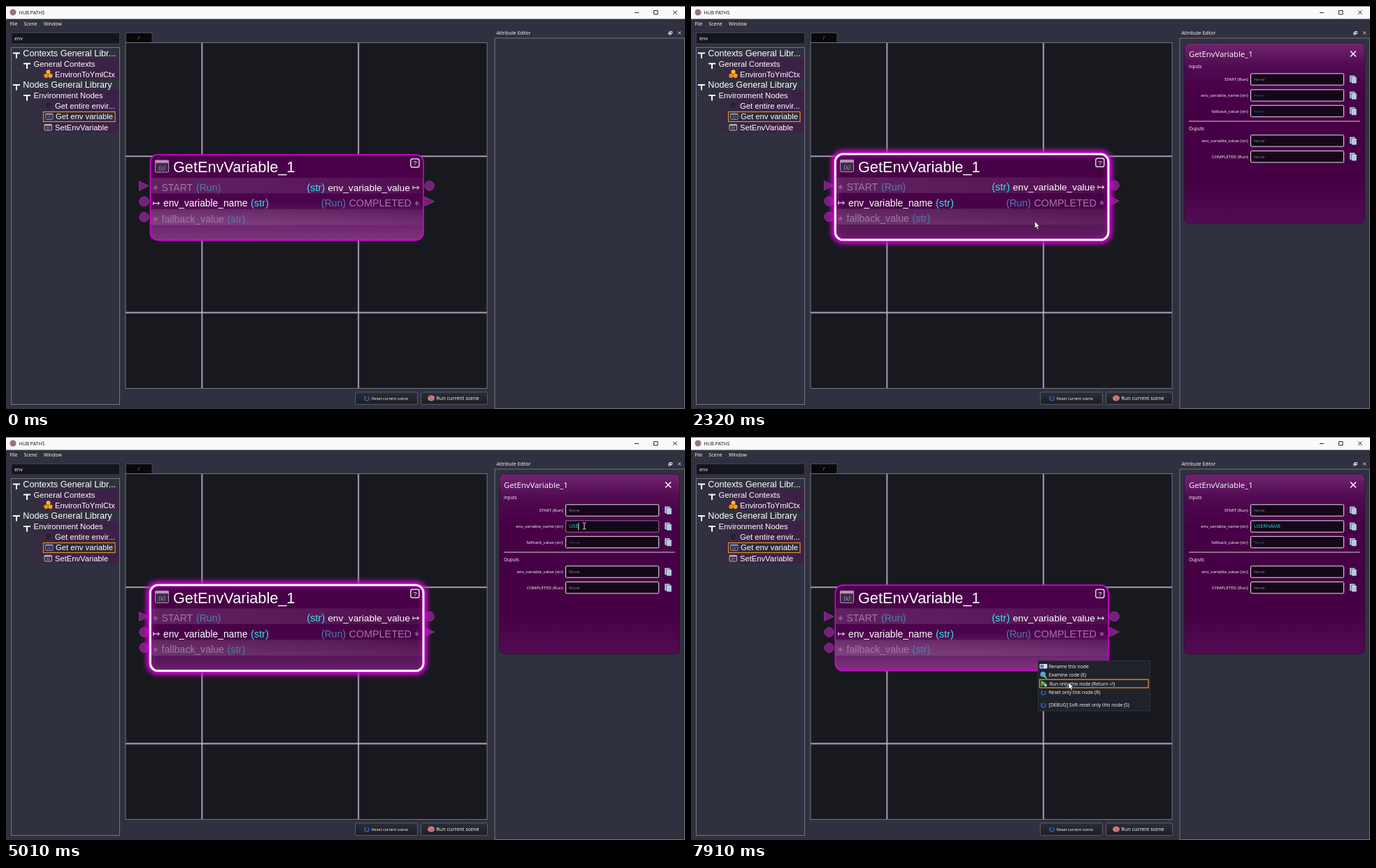
Write an HTML page that moves like this. It is 971x577 px and loops after 8 s.

```html
<!DOCTYPE html>
<html lang="en">
<head>
<meta charset="utf-8">
<title>Node editor</title>
<style>
html, body { margin: 0; width: 100%; height: 100%; overflow: hidden; background: #30313e; }
svg { display: block; width: 971px; height: 577px; font: 6.9px "Open Sans", "Noto Sans", sans-serif; fill: #fff; }
.a { font-family: "Liberation Sans", Arial, sans-serif; }
.end { text-anchor: end; }
.mid { text-anchor: middle; }
.line { fill: none; stroke: #fff; }
.frame { fill: none; stroke: #74757f; }
.dim { fill: #a277a5; }
.type { fill: #2ee6ee; }
.dimtype { fill: #4b7fb3; }
</style>
</head>
<body>
<svg id="stage" viewBox="0 0 971 577"></svg>
<script>
const LOOP = 8000;
const stage = document.getElementById('stage');

const text = (x, y, str, size = 6.9, cls = '', more = '') =>
  `<text x="${x}" y="${y}" font-size="${size}" class="${cls}" ${more}>${str}</text>`;
const rect = (x, y, w, h, more = '') =>
  `<rect x="${x}" y="${y}" width="${w}" height="${h}" ${more}/>`;
const path = (d, more = '') => `<path d="${d}" ${more}/>`;
const circle = (x, y, r, more = '') => `<circle cx="${x}" cy="${y}" r="${r}" ${more}/>`;
const gradient = (id, stops, dir = 'x2="0" y2="1"') =>
  `<linearGradient id="${id}" ${dir}>${stops.map(([at, color, alpha = 1]) =>
    `<stop offset="${at}" stop-color="${color}" stop-opacity="${alpha}"/>`).join('')}</linearGradient>`;

const branch = (x, y) => path(`M${x} ${y}h10M${x + 5} ${y}v7.5`, 'class="line" stroke-width="2"');
const star = (x, y) => path(`M${x} ${y - 3.5}v7M${x - 3} ${y - 1.7}l6 3.4M${x - 3} ${y + 1.7}l6-3.4`,
  'class="line" style="stroke:#a277a5" stroke-width=".9"');
const mapsTo = (x, y) => path(`M${x + .5} ${y - 2.5}v5M${x + .5} ${y}h8.5m-2.6-2.5l2.6 2.5l-2.6 2.5`, 'class="line"');
const reload = (x, y, r) => path(`M${x - r * .7} ${y - r * .7}A${r} ${r} 0 1 0 ${x + r * .5} ${y - r * .87}`,
  'fill="none" stroke="#2a62b8" stroke-width="1.6"') +
  path(`M${x - r * 1.3} ${y - r}h${r}v${r}z`, 'fill="#2a62b8"');
const winIcon = (x, y, w, h, color, glyph) =>
  rect(x, y, w, h, `rx="1" fill="#3b2b4a" stroke="${color}"`) +
  rect(x, y, w, h * .22, `fill="${color}"`) +
  text(x + w / 2, y + h * .82, '(x)', glyph, 'mid', `font-style="italic" style="fill:${color}"`);

const defs = `<defs>
  ${gradient('rowFill', [[0, '#3d2047', 0], [.35, '#3d2047', .7], [1, '#3d2047']], '')}
  ${gradient('bodyFill', [[0, '#4a0049'], [.55, '#4b034b'], [.75, '#642064'], [1, '#80327f']])}
  ${gradient('bodyOnFill', [[0, '#480047'], [.6, '#480347'], [.8, '#561656'], [1, '#5e1c5e']])}
  ${gradient('bandFill', [[0, '#fff', .13], [.6, '#fff', .09], [1, '#fff', .04]], '')}
  ${gradient('cardFill', [[0, '#70266f'], [.13, '#510a51'], [.3, '#470046'], [.75, '#450044'], [1, '#520c52']])}
  ${gradient('buttonFill', [[0, '#2c2e35'], [1, '#1d1e24']])}
  <filter id="blur" x="-10%" y="-20%" width="120%" height="140%"><feGaussianBlur stdDeviation="3.6"/></filter>
</defs>`;

const titleBar = rect(0, 0, 971, 18.5, 'fill="#fbf9fb"') + rect(0, 0, 971, .8, 'fill="#55505a"') +
  circle(10, 9, 4.5, 'fill="#98727f"') +
  `<g id="caption">${text(18.5, 11.7, 'HUB PATHS', 6.9, '', 'style="fill:#111"')}
  ${path('M899 9.5h6M926.5 6.5h5.5v5.5h-5.5zM954 6.5l5.5 5.5m0-5.5l-5.5 5.5', 'fill="none" stroke="#111" stroke-width=".9"')}</g>` +
  text(5.5, 27.5, 'File') + text(25.5, 27.5, 'Scene') + text(54, 27.5, 'Window');

const tintRow = y => rect(24, y - 7.6, 138, 15.2, 'fill="url(#rowFill)"');
const library = rect(7.5, 38.5, 155, 15.5, 'fill="#15161c" stroke="#3d3e49"') + text(12, 49, 'env', 7.2) +
  rect(7.5, 59.5, 155, 511, 'class="frame"') +
  [82.5, 97.7, 128, 143.2, 158.4, 173.6].map(tintRow).join('') +
  branch(10, 67.5) + branch(25, 82.5) + branch(10, 113) + branch(25, 128) +
  text(24.3, 71.5, 'Contexts General Libr...', 12.65, 'a') +
  text(39.5, 86.7, 'General Contexts', 11.3, 'a') +
  text(70, 101.5, 'EnvironToYmlCtx', 11.2, 'a') +
  text(24.3, 117.2, 'Nodes General Library', 12.65, 'a') +
  text(39.5, 132.2, 'Environment Nodes', 11.3, 'a') +
  text(70, 147.3, 'Get entire envir...', 11.25, 'a') +
  rect(53.5, 151.5, 102.5, 14, 'fill="#2e2a3a" stroke="#e0902a" stroke-width="1.2"') +
  text(71, 162.3, 'Get env variable', 11.25, 'a') +
  text(70, 177.8, 'SetEnvVariable', 11.2, 'a') +
  circle(60.5, 94.3, 3, 'fill="#ffb52e"') + circle(57.3, 99.8, 3.1, 'fill="#ee8f13"') + circle(63.4, 99.8, 3.1, 'fill="#f5a11f"') +
  text(60.5, 146, 'e', 13, 'mid', 'style="fill:#17131c"') +
  winIcon(56.5, 154, 10.5, 8.5, '#7d8fb5', 5) + winIcon(55, 169.5, 10.5, 8.5, '#b9b4c2', 5);

const button = (x, w) => rect(x, 552.8, w, 17.5, 'rx="2" fill="url(#buttonFill)" stroke="#5c5d67"');
const gridLine = d => path(d, 'stroke="#c8b2cb" stroke-opacity=".75" stroke-width="2.3"');
const canvas = rect(171.5, 38.5, 37.5, 14, 'fill="#08080a" stroke="#4c4d57"') +
  text(190, 48, '/', 7.5, 'mid', 'style="fill:#e58a1c"') +
  rect(171, 52.5, 517, 495, 'fill="#18191f"') +
  ['M280.3 53v494', 'M504 53v494', 'M171 215.2h517', 'M171 439h517'].map(gridLine).join('') +
  rect(171, 52.5, 517, 495, 'class="frame"') +
  button(499.5, 89) + button(593.5, 95) +
  reload(516, 562, 3) + text(523, 564, 'Reset current scene', 5.65) +
  `<ellipse cx="608" cy="561.5" rx="5" ry="4" fill="#d98289"/>` +
  path('M604 561q2-3 4 0t4 0M606 564q2-2 4 0', 'fill="none" stroke="#8f3f4c" stroke-width=".8"') +
  text(615.3, 564.3, 'Run current scene', 7.25);

const port = 'fill="#76207a" stroke="#932f95"';
const outline = more => rect(206.3, 212.7, 390.6, 122.7, `rx="11" ${more}`);
const node = `<g id="node">` +
  path('M190.5 251v13l13.5-6.5zM598.8 273.3v13l13.5-6.5z', port) +
  circle(197.5, 280, 6.7, port) + circle(197.5, 302.3, 6.7, port) + circle(605.5, 257.5, 6.7, port) +
  `<g class="on">${outline('fill="none" stroke="#d800d8" stroke-width="10" filter="url(#blur)"')}${outline('fill="url(#bodyOnFill)"')}</g>` +
  `<g class="off">${outline('fill="url(#bodyFill)"')}</g>` +
  rect(207, 246, 389.5, 22.4, 'fill="url(#bandFill)"') + rect(207, 291, 389.5, 22.6, 'fill="url(#bandFill)"') +
  `<g class="off">${outline('fill="none" stroke="#d800d8" stroke-width="1.6"')}</g>` +
  `<g class="on">${outline('fill="none" stroke="#d800d8" stroke-width="6" stroke-opacity=".55" filter="url(#blur)"')}
    ${outline('fill="none" stroke="#fff" stroke-width="3"')}</g>` +
  winIcon(213.5, 221, 19, 17, '#b892bb', 9) +
  text(239, 238.2, 'GetEnvVariable_1', 21.7, 'a') +
  rect(578.8, 218.8, 12, 12, 'rx="2.5" class="line" stroke-width="1.2"') + text(584.8, 228.3, '?', 9.5, 'a mid') +
  star(213.8, 260) + text(222.5, 264.6, 'START', 14, 'a dim') + text(272, 264.6, '(Run)', 14.1, 'a dimtype') +
  mapsTo(210.3, 282.5) + text(225, 287.4, 'env_variable_name', 13.8, 'a') + text(350, 287.4, '(str)', 14.5, 'a type') +
  star(213.8, 305) + text(222.5, 309.8, 'fallback_value', 14.1, 'a dim') + text(316.5, 309.8, '(str)', 14.5, 'a dimtype') +
  text(456, 264.6, '(str)', 14.5, 'a end type') + text(577.8, 264.6, 'env_variable_value', 13.65, 'a end') + mapsTo(581.5, 260) +
  text(486, 287.4, '(Run)', 14.1, 'a end dimtype') + text(580, 287.4, 'COMPLETED', 14.4, 'a end dim') + star(587.5, 282.5) +
  `</g>`;

const field = (y, label, color, id = '') =>
  text(796.5, y + 2.4, label, 6.1, 'end') +
  rect(800.5, y - 8.2, 133, 16.4, `rx="1" fill="#170519" stroke="#e9dfea" ${id && `id="${id}Box"`}`) +
  text(805, y + 2.4, 'None', 6.1, '', `style="fill:${color}" ${id && `id="${id}"`}`) +
  rect(942.5, y - 5, 6.5, 8.5, 'fill="#7f9fc0" stroke="#d9e6f0" stroke-width=".8"') +
  rect(945, y - 3, 6.5, 8.5, 'fill="#d9e8f2" stroke="#6889aa" stroke-width=".7"') +
  path(`M946.3 ${y - .5}h4m-4 2h4m-4 2h4`, 'stroke="#6889aa" stroke-width=".7"');
const editor = text(701.5, 41.3, 'Attribute Editor', 6.8) +
  path('M949 36.5h3.5v3h-3.5zM947.7 38h3v3h-3zM961.2 36.5l4 4m0-4l-4 4', 'class="line" stroke-width=".8"') +
  rect(699, 46, 271.5, 530.5, 'class="frame"') +
  `<g id="card">` + rect(705.5, 53, 258, 258, 'rx="7" fill="url(#cardFill)" stroke="#24102a" stroke-width=".7"') +
  text(712, 73, 'GetEnvVariable_1', 11.3) + path('M943 64.5l8 8m0-8l-8 8', 'class="line" stroke-width="1.5"') +
  text(712, 89.3, 'Inputs', 6.3) + text(712, 177.5, 'Ouputs', 6.3) + path('M712 165h244.5', 'class="line" stroke-opacity=".8"') +
  field(105, 'START (Run)', '#8b8290') + field(128, 'env_variable_name (str)', '#3c5578', 'value') +
  field(150.5, 'fallback_value (str)', '#3c5578') + field(193, 'env_variable_value (str)', '#8b8290') +
  field(215.7, 'COMPLETED (Run)', '#8b8290') + rect(0, 123, .9, 10, 'id="caret"') + `</g>`;

const menu = `<g id="menu">` + rect(496.5, 320.5, 160, 71.5, 'fill="#20222b" stroke="#30323c"') +
  rect(498.5, 347.2, 155.5, 11.8, 'id="pick" fill="#23242c" stroke="#e0902a" stroke-width="1.3"') +
  rect(498.5, 325, 11, 6.5, 'rx="1" fill="#dbe6f2"') + rect(499.5, 326, 5, 4.5, 'fill="#4b82c4"') +
  path('M505.5 342.5l3 3', 'stroke="#c8ccd4" stroke-width="1.6"') + circle(503.3, 339.8, 3.3, 'fill="#3ba6dc" stroke="#a9d4ee" stroke-width=".8"') +
  path('M500.5 348.5v8.5l8-4.2z', 'fill="#39c436"') + circle(507, 355.5, 1.8, 'fill="#d8ead6"') +
  reload(504, 366, 3) + reload(504, 384, 3) +
  text(511.7, 330.6, 'Rename this node', 6.75) + text(511.7, 343, 'Examine code (E)', 6.75) +
  text(512.7, 355.6, 'Run only this node (Return ⏎)', 6.75) + text(511.7, 368.4, 'Reset only this node (R)', 6.75) +
  text(511.7, 386.4, '[DEBUG] Soft-reset only this node (S)', 6.75) + `</g>`;

const pointers = path('M0 0V9.6L2.2 7.6L3.8 11.2L5.4 10.5L3.8 7H6.9Z', 'id="arrow" stroke="#222" stroke-width=".6"') +
  path('M-2.3-4.6q2 0 2.3 1q.3-1 2.3-1M0-3.6v7.4M-2.3 4.8q2 0 2.3-1q.3 1 2.3 1', 'id="beam" class="line" stroke-width=".9"');

stage.innerHTML = defs + rect(0, 0, 971, 577, 'fill="#30313e"') + titleBar + library + canvas + node + editor + menu + pointers;

const $ = id => document.getElementById(id);
const show = (el, on) => el.style.display = on ? '' : 'none';
const ramp = (t, from, to) => Math.min(1, Math.max(0, (t - from) / (to - from)));

// time, x, y of the pointer
const track = [
  [1270, 413.5, 507.5], [1540, 514, 405], [1800, 491.7, 308.5], [2490, 491.7, 308.5],
  [2800, 893, 137], [3120, 864, 62.5], [3160, 864, 62.5], [3250, 862, 82], [3300, 862, 82], [3640, 830, 124],
  [4030, 825, 126], [4110, 827, 127.3], [6330, 827, 127.3], [6660, 590, 420], [6790, 590, 420],
  [7060, 496.8, 320.5], [7660, 496.8, 320.5], [7910, 540, 351.5]
];
function pointerAt(t) {
  const i = track.findIndex(p => p[0] > t);
  if (i < 0) return track[track.length - 1].slice(1);
  const [a, b] = [track[Math.max(0, i - 1)], track[i]];
  const k = ramp(t, a[0], b[0]), e = k * k * (3 - 2 * k);
  return [a[1] + (b[1] - a[1]) * e, a[2] + (b[2] - a[2]) * e];
}

const WORD = 'USERNAME';
const keys = [4720, 4810, 5010, 5220, 5420, 5460, 5670, 5710];

function draw(t) {
  const active = 1 - ramp(t, 250, 450) + ramp(t, 2090, 2200);
  $('caption').setAttribute('opacity', .45 + .55 * active);

  const selected = t >= 2130 && t < 6730;
  stage.querySelectorAll('.on').forEach(el => show(el, selected));
  stage.querySelectorAll('.off').forEach(el => show(el, !selected));
  $('node').setAttribute('transform', `translate(0 ${t < 2130 ? 0 : -.6})`);
  show($('card'), t >= 2270);

  const typed = keys.filter(k => t >= k).length;
  const focus = t >= 3960 && t < 6730;
  const value = $('value');
  value.textContent = typed ? WORD.slice(0, typed) : 'None';
  value.setAttribute('font-size', typed ? 7.25 : 6.1);
  value.style.fill = typed ? '#1fd8d8' : '#3c5578';
  $('valueBox').setAttribute('stroke-dasharray', focus ? '1.2 1.2' : 'none');
  show($('caret'), focus && !(t >= 4520 && t < 4720));
  if (focus) $('caret').setAttribute('x', typed ? 805 + value.getComputedTextLength() : 805);

  const [x, y] = pointerAt(t);
  const inField = t >= 2270 && x > 800 && x < 934 && Math.abs(y - 128) < 8.5;
  show($('arrow'), t >= 1270 && !inField);
  show($('beam'), inField);
  for (const id of ['arrow', 'beam']) $(id).setAttribute('transform', `translate(${x} ${y})`);

  $('menu').setAttribute('opacity', ramp(t, 7150, 7240));
  show($('pick'), y > 322);
  $('pick').setAttribute('y', y < 334.5 ? 322 : y < 347 ? 334.6 : 347.2);
}

const start = performance.now();
function tick() {
  draw((performance.now() - start) % LOOP);
  requestAnimationFrame(tick);
}
tick();
</script>
</body>
</html>
```
